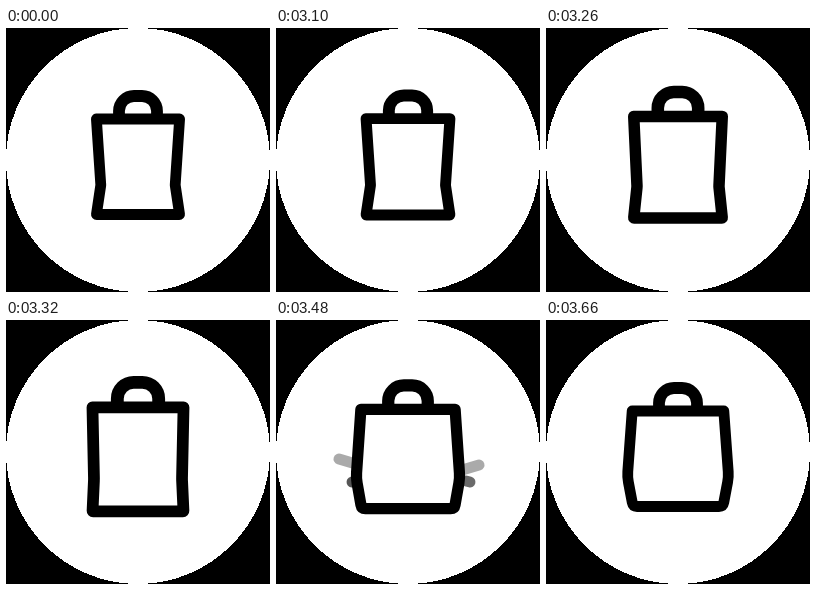
An HTML page for the animation above (3680 ms loop, 264 by 264 pixels).

```html
<!DOCTYPE html>
<html lang="en">
<head>
<meta charset="utf-8">
<title>Shopping bag</title>
<style>
  html, body { margin: 0; width: 100%; height: 100%; overflow: hidden; background: #000; }
  svg { display: block; width: 100vw; height: 100vh; }
  path { stroke: #000; stroke-linecap: round; stroke-linejoin: round; }
</style>
</head>
<body>
<svg viewBox="0 0 264 264">
  <circle cx="132" cy="132" r="132" fill="#fff" shape-rendering="crispEdges"/>
  <g id="sparks" fill="none" stroke-width="11"></g>
  <g id="bag" fill="#fff" stroke-width="10.8">
    <path stroke-width="11.8" d="M113 90V83A15 15 0 0 1 128 68H136A15 15 0 0 1 151 83V90"/>
    <path id="body"/>
  </g>
</svg>
<script>
const LOOP = 3680, STEP = 20, MID = 132;

// [time, value] pairs
const SCALE = [[3020, 1], [3100, 1.008], [3180, 1.028], [3260, 1.063], [3320, 1.088],
  [3360, 1.098], [3400, 1.097], [3440, 1.078], [3480, 1.04], [3540, 1.012], [3600, 1]];
const PUFF = [[3160, 0], [3260, 0.1], [3340, 0.29], [3400, 0.52], [3440, 0.74],
  [3480, 0.94], [3540, 0.98], [3620, 1]];

// Start point, direction, start time and fade-out time of each side stroke
const SPARKS = [
  { x: 83, y: 145, dx: -1, dy: -0.3, start: 3380, end: 3560 },
  { x: 183, y: 151, dx: 1, dy: -0.3, start: 3380, end: 3560 },
  { x: 80, y: 161, dx: -1, dy: 0.25, start: 3460, end: 3640 },
  { x: 190, y: 161, dx: 1, dy: 0.25, start: 3460, end: 3620 }
];

const bag = document.getElementById("bag");
const body = document.getElementById("body");
const sparkLayer = document.getElementById("sparks");
for (const s of SPARKS) {
  s.el = document.createElementNS("http://www.w3.org/2000/svg", "path");
  sparkLayer.append(s.el);
}

const mix = (a, b, k) => a + (b - a) * k;

function sample(keys, t) {
  if (t <= keys[0][0]) return keys[0][1];
  for (let i = 1; i < keys.length; i++) {
    const [t0, a] = keys[i - 1], [t1, b] = keys[i];
    if (t <= t1) return mix(a, b, (t - t0) / (t1 - t0));
  }
  return keys[keys.length - 1][1];
}

// Half widths run from a pinched waist (0) to a bulging one (1); the ends follow later
function bodyPath(k) {
  const late = k * k;
  const top = [mix(41.6, 45.8, late), 91];
  const waist = [mix(37.2, 50.6, k), 157];
  const foot = [mix(41.6, 45, late), 186.5];
  const between = (a, b, f) => [mix(a[0], b[0], f), mix(a[1], b[1], f)];
  const inset = mix(0.3, 4, late);
  const side = [top, between(waist, top, mix(0.01, 0.08, k)), waist,
    between(waist, foot, mix(0.02, 0.18, k)), between(foot, waist, inset / 30),
    foot, [foot[0] - inset, foot[1]]];
  const right = side.map(([x, y]) => `${MID + x} ${y}`);
  const left = side.map(([x, y]) => `${MID - x} ${y}`).reverse();
  return `M${right[0]}L${right[1]}Q${right[2]} ${right[3]}L${right[4]}Q${right[5]} ${right[6]}` +
    `L${left[0]}Q${left[1]} ${left[2]}L${left[3]}Q${left[4]} ${left[5]}L${left[6]}Z`;
}

function drawSpark(s, t) {
  const shown = t >= s.start && t < s.end;
  s.el.style.display = shown ? "" : "none";
  if (!shown) return;
  const head = 0.2 * (t - s.start);
  const tail = Math.max(0, head - 16);
  const at = d => `${s.x + s.dx * d} ${s.y + s.dy * d}`;
  s.el.setAttribute("d", `M${at(tail)}L${at(head)}`);
  s.el.setAttribute("opacity", Math.min(1, (s.end - t) / 240));
}

function draw(t) {
  const scale = sample(SCALE, t);
  bag.setAttribute("transform", `translate(${MID} ${MID}) scale(${scale}) translate(${-MID} ${-MID})`);
  body.setAttribute("d", bodyPath(sample(PUFF, t)));
  SPARKS.forEach(s => drawSpark(s, t));
}

const begin = performance.now();
function tick() {
  const t = (performance.now() - begin) % LOOP;
  draw(Math.floor(t / STEP) * STEP);
  requestAnimationFrame(tick);
}
tick();
</script>
</body>
</html>
```
